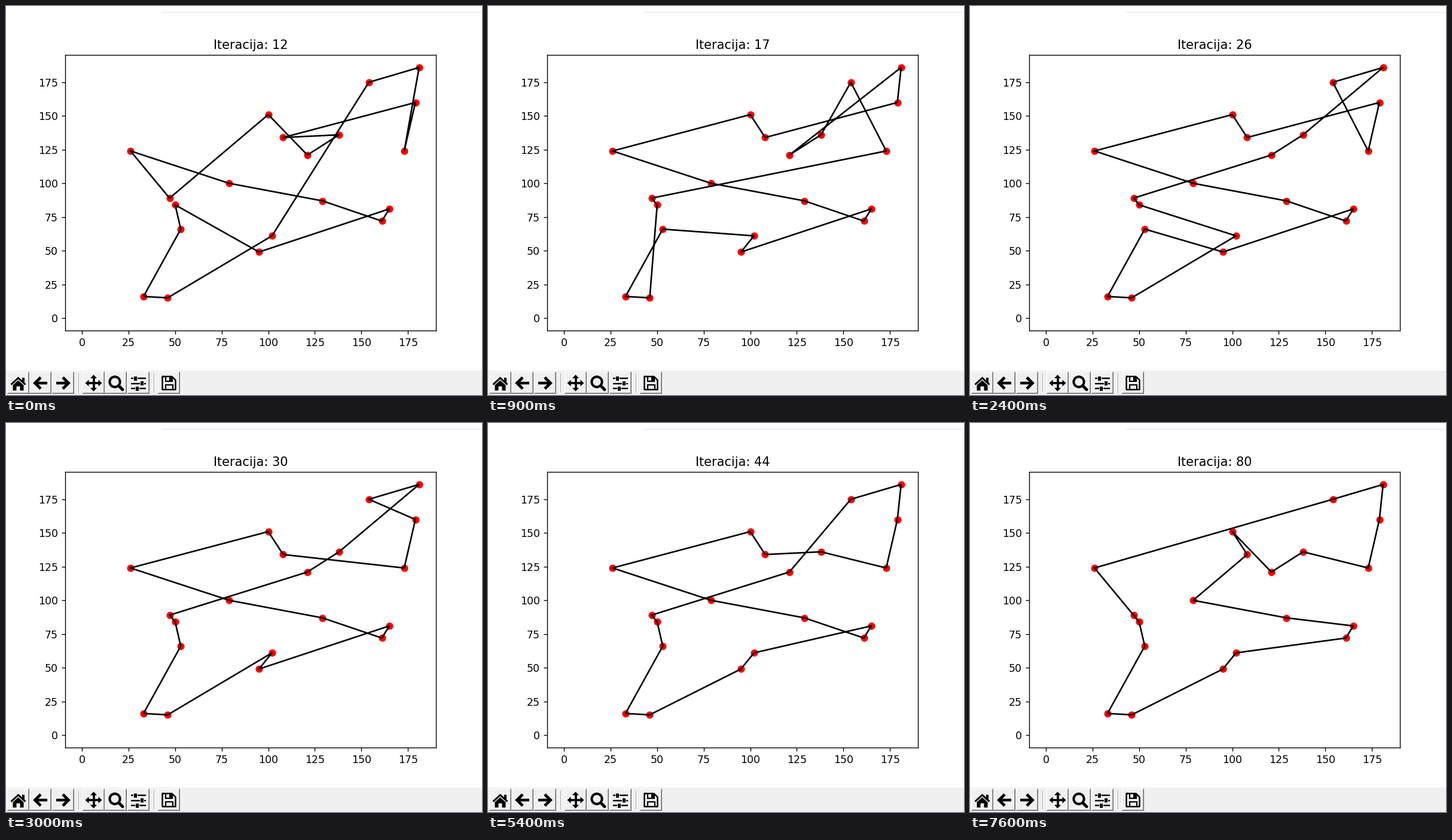
Animation, 796 px wide and 652 px high, one loop 8 s. Source, as a matplotlib script:

```python
import matplotlib.pyplot as plt
import numpy as np
from matplotlib.animation import FuncAnimation
from matplotlib.patches import Circle, Polygon, Rectangle

W, H, DPI = 796, 652, 125
STEP = 100
FRAMES = 80
PT = 72 / DPI  # points per pixel

CITIES = {
    "A": (26, 124), "B": (47, 89), "C": (50, 84), "D": (53, 66),
    "E": (33, 16), "F": (46, 15), "G": (95, 49), "H": (102, 61),
    "I": (79, 100), "J": (129, 87), "K": (161, 72), "L": (165, 81),
    "M": (100, 151), "N": (108, 134), "O": (121, 121), "P": (138, 136),
    "Q": (154, 175), "R": (181, 186), "S": (179, 160), "T": (173, 124),
}

# best route from a given time (ms) on
ROUTES = [
    (0, "ABMOPNSTRQHFEDCGLKJI"),
    (300, "AMNSRTOPQBCHFEDGLKJI"),
    (700, "AMNSROPQTBCFEDHGLKJI"),
    (1200, "AMNSRTQPOBCFEDHGLKJI"),
    (1500, "AMNSTQRPOBCHFEDGLKJI"),
    (2500, "AMNSTQRPOBCDEFHGLKJI"),
    (2900, "AMNTSQRPOBCDEFHGLKJI"),
    (3500, "AMNPTSRQOBCDEFHGLKJI"),
    (3900, "AMNPTSRQOBCFEDGHLKJI"),
    (4400, "AMNPTSRQOBCDEFGHLKJI"),
    (6700, "AQRSTPOMNIJKLHGFEDCB"),
    (7500, "AQRSTPOMNIJLKHGFEDCB"),
]

# times (in steps) at which the counter advances by one, starting from 12
TICKS = [2, 4, 6, 8, 9, 11, 13, 15, 17, 18, 19, 20, 22, 24, 25, 27, 29, 30,
         32, 34, 35, 37, 38, 40, 42, 44, 46, 48, 49, 50, 52, 54, 55, 57, 59,
         61, 62, 63]
JUMPS = [(76, 80), (75, 79), (67, 59)]


def iteration(step):
    for start, value in JUMPS:
        if step >= start:
            return value
    return 12 + int(np.searchsorted(TICKS, step, side="right"))


def route(step):
    tour = [r for t, r in ROUTES if t <= step * STEP][-1]
    return np.array([CITIES[c] for c in tour + tour[0]])


fig = plt.figure(figsize=(W / DPI, H / DPI), dpi=DPI, facecolor="white")
plt.rcParams["font.family"] = "DejaVu Sans"

# window chrome, in pixel coordinates
ui = fig.add_axes([0, 0, 1, 1], zorder=-1)
ui.set(xlim=(0, W), ylim=(H, 0))
ui.axis("off")


def box(x0, y0, x1, y1, color):
    ui.add_patch(Rectangle((x0, y0), x1 - x0, y1 - y0, fc=color, lw=0))


def poly(points, color="black"):
    ui.add_patch(Polygon(points, closed=True, fc=color, lw=0))


def stroke(points, width, color="black", cap="butt", join="miter"):
    xs, ys = zip(*points)
    ui.plot(xs, ys, color=color, lw=width * PT, solid_capstyle=cap,
            solid_joinstyle=join)


def button(x, y=613, w=37, h=37):
    box(x, y, x + w, y + h, "#696969")
    box(x, y, x + w - 1, y + h - 1, "#ffffff")
    box(x + 1, y + 1, x + w - 1, y + h - 1, "#a0a0a0")
    box(x + 1, y + 1, x + w - 2, y + h - 2, "#f0f0f0")


def home(x, y):
    stroke([(x - 12, y + 2), (x, y - 9), (x + 12, y + 2)], 3)
    box(x + 6, y - 10, x + 10, y - 2, "black")
    poly([(x - 9, y + 3), (x, y - 5), (x + 9, y + 3), (x + 9, y + 12),
          (x + 3, y + 12), (x + 3, y + 5), (x - 3, y + 5), (x - 3, y + 12),
          (x - 9, y + 12)])


def arrow(x, y, d):
    stroke([(x - 11 * d, y), (x + 9 * d, y)], 4.5)
    stroke([(x, y - 9.5), (x + 9.5 * d, y), (x, y + 9.5)], 4.8)


def pan(x, y):
    for ux, uy in ((1, 0), (-1, 0), (0, 1), (0, -1)):
        stroke([(x, y), (x + 10 * ux, y + 10 * uy)], 3.6)
        bx, by = x + 8 * ux, y + 8 * uy
        poly([(x + 14 * ux, y + 14 * uy), (bx - 5.5 * uy, by + 5.5 * ux),
              (bx + 5.5 * uy, by - 5.5 * ux)])


def zoom(x, y):
    ui.add_patch(Circle((x - 2, y - 2), 8.6, fill=False, lw=4 * PT))
    stroke([(x + 4.5, y + 4.5), (x + 11, y + 11)], 5, cap="round")


def sliders(x, y):
    for dy, knob in ((-8.5, -5), (0, 6), (8.5, -2)):
        stroke([(x - 12.5, y + dy), (x + 12.5, y + dy)], 2.4)
        box(x + knob - 3.5, y + dy - 3.5, x + knob + 3.5, y + dy + 3.5,
            "#f0f0f0")
        box(x + knob - 2.5, y + dy - 3.5, x + knob + 2.5, y + dy + 3.5,
            "black")


def disk(x, y):
    stroke([(x - 11, y - 11), (x + 5, y - 11), (x + 11, y - 5),
            (x + 11, y + 11), (x - 11, y + 11), (x - 11, y - 11),
            (x - 8, y - 11)], 2.4, join="round")
    stroke([(x - 6, y - 11), (x - 6, y - 3), (x + 5, y - 3),
            (x + 5, y - 11)], 2.2)
    box(x, y - 10, x + 4, y - 4, "black")
    stroke([(x - 6, y + 11), (x - 6, y + 3), (x + 6, y + 3),
            (x + 6, y + 11)], 2.2)


box(260, 10, W, 11, "#e2e2e2")
box(0, 611, W, H, "#f0f0f0")
for x in (2, 39, 77, 128, 165, 203, 254):
    button(x)
for x in (121, 247):
    box(x, 616, x + 1, 648, "#a8a8a8")
    box(x + 1, 616, x + 2, 648, "#ffffff")
home(20.5, 632.5)
arrow(58, 632, -1)
arrow(95, 632, 1)
pan(146.5, 632)
zoom(184, 632)
sliders(221.5, 632.5)
disk(272.5, 632)
# patches and strokes keep their drawing order
for order, artist in enumerate(ui.get_children()):
    if artist in ui.patches or artist in ui.lines:
        artist.set_zorder(1 + order / 1000)

# route plot
ax = fig.add_axes([99 / W, 108 / H, 620 / W, 462 / H])
ax.set(xlim=(-9.05, 190.05), ylim=(-9.3, 195.3),
       xticks=range(0, 176, 25), yticks=range(0, 176, 25))
ax.scatter(*zip(*CITIES.values()), color="red")
line, = ax.plot([], [], color="black", lw=1.5)
title = ax.set_title("")


def update(step):
    line.set_data(*route(step).T)
    title.set_text(f"Iteracija: {iteration(step)}")
    return line, title


anim = FuncAnimation(fig, update, frames=FRAMES, interval=STEP, repeat=True,
                     repeat_delay=0, blit=False)
plt.show()
```
